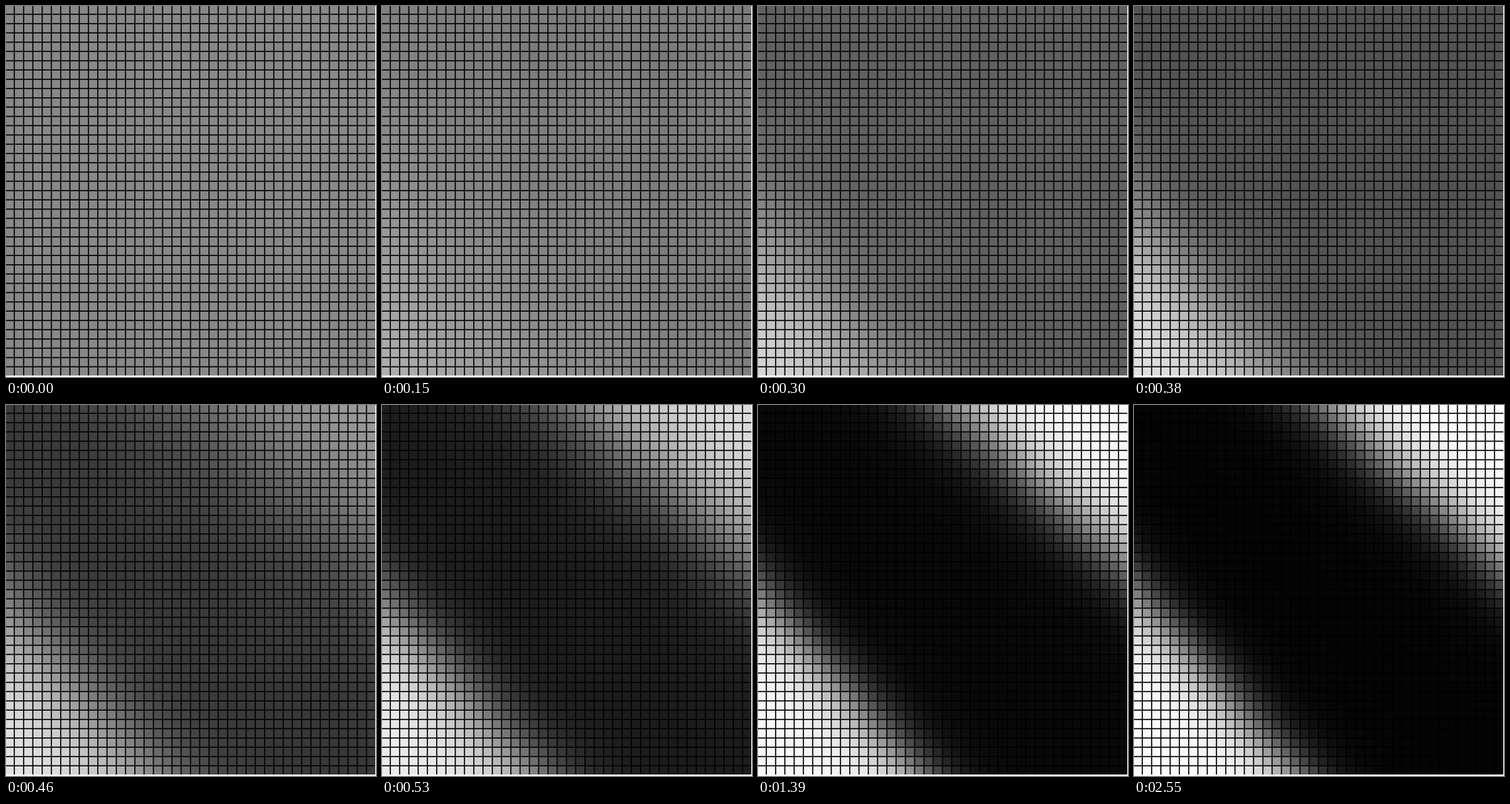
Write an HTML page with a canvas that moves like this. It is 499 px wide and 500 px high and loops after 5480 ms.

```html
<!DOCTYPE html>
<html>
<head>
<meta charset="utf-8">
<style>
html, body { margin: 0; width: 100%; height: 100%; overflow: hidden; background: #fff; }
canvas { display: block; }
</style>
</head>
<body>
<canvas id="map" width="499" height="500"></canvas>
<script>
const ctx = document.getElementById('map').getContext('2d');
const LOOP = 5480, SETTLED = 2550;
const CELLS = 40, PITCH = 12.5, SIZE = 11, SPAN = 498;
const jumps = [150, 230, 300, 380, 460, 530, 610];

const mix = (a, b, f) => a + (b - a) * f;
const sigmoid = z => 1 / (1 + Math.exp(-z));

// How far each corner has been learned, 0 to 1:
// hard steps first, then a slow approach.
function progress(t) {
  const n = jumps.filter(j => j <= t).length;
  const first = Math.min(n / 4, 1);
  const second = n < jumps.length
    ? Math.max(0, n - 4) * 0.335
    : 1 - 136 / Math.min(t, SETTLED);
  return [first, second];
}

// A soft corner lobe; dx and dy are distances from its corner.
const lobe = (dx, dy, reachX, reachY, steep) =>
  sigmoid(steep * (1 - dx / reachX - dy / reachY));

function draw(t) {
  const [a, b] = progress(t);
  const base = mix(136, 82, a);
  const floor = base * (1 - b);
  const lowPeak = mix(mix(136, 228, a ** 0.3), 255, b ** 3);
  const highPeak = mix(base, 255, 1 - (1 - b) ** 1.5);
  const lowReach = 100 + 80 * a + 42 * b;
  const lowSteep = 3.8 * a + 5.3 * b * b;
  const highSteep = 2.6 + 5.8 * b ** 3;

  ctx.fillStyle = '#fff';
  ctx.fillRect(0, 0, 499, 500);
  ctx.fillStyle = '#000';
  ctx.fillRect(0, 0, SPAN, SPAN);
  for (let row = 0; row < CELLS; row++) {
    for (let col = 0; col < CELLS; col++) {
      const left = col * PITCH - 0.5, top = row * PITCH - 0.5;
      const x = left + SIZE / 2, y = top + SIZE / 2;
      const low = lobe(x, SPAN - y, lowReach, lowReach * 1.13, lowSteep);
      const high = lobe(SPAN - x, y, 225 + 18 * b, 175 + 45 * b, highSteep);
      const v = Math.round(floor + (lowPeak - floor) * low + (highPeak - floor) * high);
      ctx.fillStyle = `rgb(${v},${v},${v})`;
      ctx.fillRect(left, top, SIZE, SIZE);
    }
  }
}

const start = performance.now();
function tick() {
  draw((performance.now() - start) % LOOP);
  requestAnimationFrame(tick);
}
tick();
</script>
</body>
</html>
```
